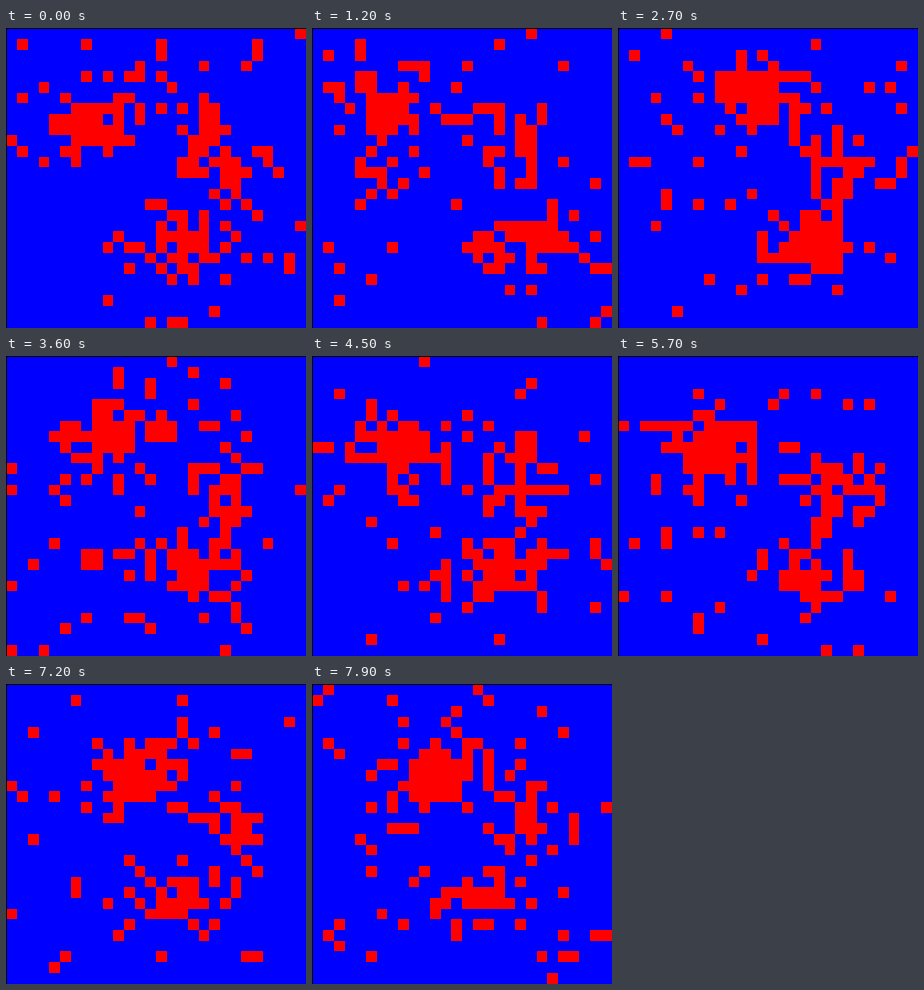
Write a matplotlib script that moves like this. It is 300 px wide and 300 px high and loops after 8 s.

```python
import numpy as np
import matplotlib.pyplot as plt
from matplotlib.animation import FuncAnimation
from matplotlib.colors import ListedColormap

SIZE, CELLS = 300, 28
INNER = SIZE - 1  # one black pixel stays free at the left and top
FRAMES, STEP = 80, 100

gy, gx = np.mgrid[:CELLS, :CELLS].astype(float)
# cell index of every pixel, with cell edges rounded down
pick = np.ceil(np.arange(1, SIZE) * CELLS / INNER).astype(int) - 1

# Centres of the three drifting clusters at a few key times
keys = [0, 12, 27, 45, 57, 66, 79]
head = [7, 6.5, 12, 7, 8, 12, 11], [8, 7, 5.5, 8, 8, 9, 8]
side = [18.5, 20, 20.5, 19, 19, 21.5, 19], [11, 10, 13, 10.5, 12, 13, 12]
foot = [16, 20, 17.5, 17.5, 17, 17, 15], [19.5, 19, 19.5, 20, 20.5, 20, 19]


def at(path, i):
    """Position on a path, easing in and out of each key time."""
    k = min(np.searchsorted(keys, i, side="right") - 1, len(keys) - 2)
    u = (i - keys[k]) / (keys[k + 1] - keys[k])
    u = u * u * (3 - 2 * u)
    return [p[k] + (p[k + 1] - p[k]) * u for p in path]


def cluster(path, i, wide, high):
    x, y = at(path, i)
    return np.exp(-((gx - x) / wide) ** 2 / 2 - ((gy - y) / high) ** 2 / 2)


def make_ring():
    """Faint loop through the clusters, open at the lower left."""
    dx, dy = gx - 13, gy - 13.5
    band = np.exp(-((np.hypot(dx, dy) - 7.5) / 2.2) ** 2 / 2)
    return band * (1 - 0.8 * np.exp(-((dx + 7) ** 2 + (dy - 6) ** 2) / 30))


ring = make_ring()


def sample(i):
    """Draw every cell at random, likely red inside the clusters."""
    chance = (0.04 + 0.12 * ring
              + 1.1 * cluster(head, i, 2.6, 1.9)
              + 0.6 * cluster(side, i, 1.9, 2.2)
              + 0.9 * cluster(foot, i, 2.8, 1.5))
    rng = np.random.default_rng(700 + i)
    cells = rng.random(chance.shape) < np.minimum(chance, 0.97)
    return cells[np.ix_(pick, pick)]


fig = plt.figure(figsize=(SIZE / 100, SIZE / 100), dpi=100, facecolor="black")
ax = fig.add_axes([1 / SIZE, 0, INNER / SIZE, INNER / SIZE])
ax.axis("off")
image = ax.imshow(sample(0), cmap=ListedColormap(["#0000ff", "#ff0000"]),
                  vmin=0, vmax=1, interpolation="nearest", aspect="auto")


def update(i):
    image.set_data(sample(i))
    return [image]


anim = FuncAnimation(fig, update, frames=FRAMES, interval=STEP,
                     repeat=True, repeat_delay=0)
plt.show()
```
